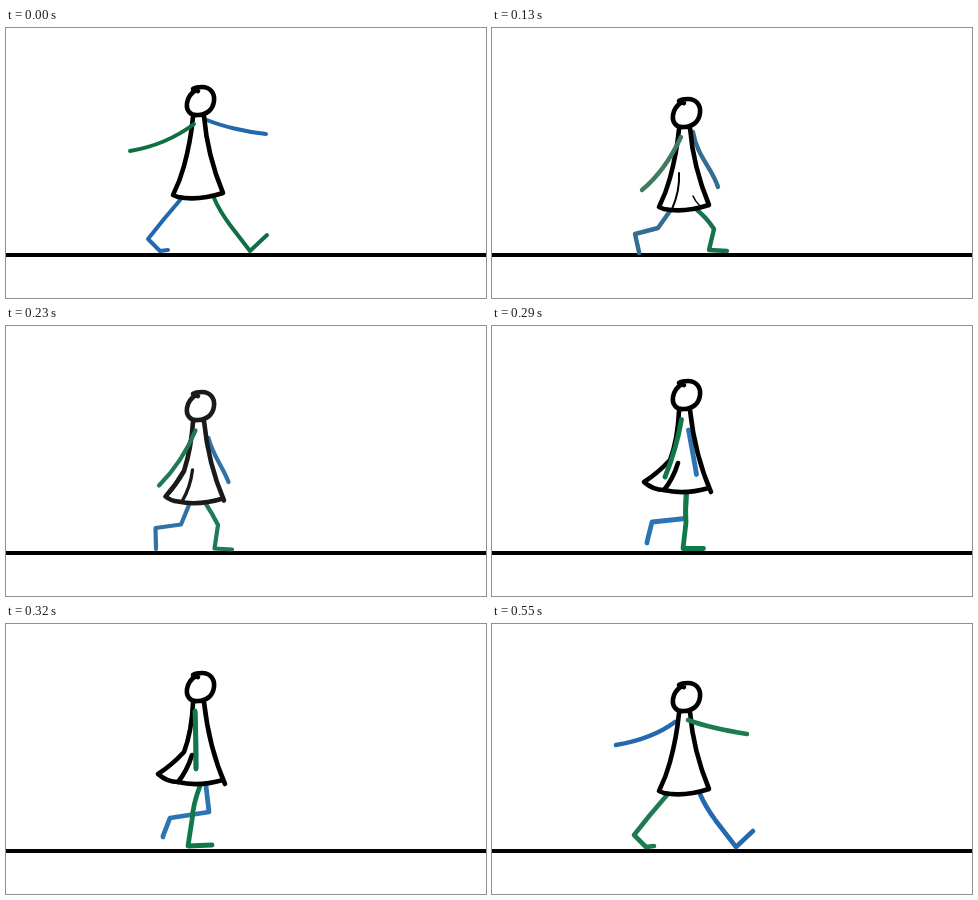
An HTML page for the animation above (650 ms loop, 480 by 270 pixels).

```html
<!DOCTYPE html>
<html lang="en">
<head>
<meta charset="utf-8">
<title>Walk cycle</title>
<style>
  html, body { margin: 0; width: 100%; height: 100%; overflow: hidden; background: #fff; }
  svg { display: block; width: 100%; height: 100%; }
  path { fill: none; stroke-linecap: round; stroke-linejoin: round; }
</style>
</head>
<body>
<svg viewBox="0 0 480 270">
  <rect y="225" width="480" height="4"/>
  <g id="walker"></g>
</svg>
<script>
const HEAD = 'M192 63 L187 61 Q190 59 196 59 C204 59 209 65 208 73 C207 82 200 87 192 87 C184 88 180 82 181 75 C182 69 185 65 190 62';

// Dress outlines and folds are drawn at rest height and moved by the bob.
const STRAIGHT = 'M187 89 C185 110 181 127 178 138 Q174 153 167 167 Q169 168 172 169 Q192 173 217 165 M198 88 C200 112 207 141 217 165';
const FLARED = 'M187 89 C186 112 181 130 178 138 Q166 151 152 160 Q161 168 172 168 Q192 173 217 166 M198 88 C201 115 208 145 219 170';
const TRAILING = 'M186 88 C184 116 176 140 152 166 Q160 170 170 169 Q188 168 206 171 C204 150 202 116 198 88';
const FLARED_FOLD = 'M186 141 Q181 157 172 168';

const contact = {
  bob: 0, dress: STRAIGHT, green: '#0f6f43', blue: '#2268ad', limbWidth: 4,
  greenArm: 'M188 96 Q160 117 124 123',
  blueArm: 'M201 92 C215 98 240 104 260 106',
  greenLeg: 'M208 170 Q213 182 224 197 L244 223 L261 207',
  blueLeg: 'M175 171 L158 191 L142 211 L154 223 L162 222'
};
const down = {
  bob: 12, dress: STRAIGHT, green: '#16724a', blue: '#336d92', armGreen: '#427a61', limbWidth: 4.4,
  fold: 'M187 133 Q188 151 180 169', foldWidth: 2, crease: 'M201 156 Q203 161 208 166',
  greenArm: 'M189 109 Q173 143 150 162',
  blueArm: 'M201 104 C205 128 220 140 226 159',
  greenLeg: 'M205 182 Q214 189 222 201 L217 222 L235 223',
  blueLeg: 'M178 183 L166 200 L143 206 L147 224 L147 225'
};
const passing = {
  bob: 2, dress: FLARED, ink: '#1a1a1a', green: '#217a55', blue: '#2f72a8', limbWidth: 4.2,
  fold: FLARED_FOLD, foldWidth: 4.6,
  greenArm: 'M190 100 Q179 130 156 157',
  blueArm: 'M204 120 C208 130 214 142 219 153',
  greenLeg: 'M195 174 Q199 187 202 197 L200 223 L217 224',
  blueLeg: 'M188 175 L184 197 L156 198 L153 220 L153 221'
};
const up = {
  bob: -10, dress: FLARED, green: '#107849', blue: '#2d74b5', limbWidth: 4.8,
  fold: FLARED_FOLD, foldWidth: 4.6,
  greenArm: 'M189 87 Q190 115 190 145',
  blueArm: 'M189 88 C190 105 190 125 190 144',
  greenLeg: 'M194 162 Q187 180 186 196 L182 222 L206 221',
  blueLeg: 'M200 162 L203 188 L164 194 L157 212 L157 213'
};
const reach = {
  bob: -10, dress: TRAILING, green: '#11734a', blue: '#3a736b', limbWidth: 4.2,
  fold: 'M183 143 Q181 160 168 168', foldWidth: 4,
  greenArm: 'M193 87 C199 106 215 118 227 139',
  blueArm: 'M184 92 Q169 118 138 130',
  greenLeg: 'M188 162 Q174 187 152 215 Q153 223 168 223',
  blueLeg: 'M201 163 L216 189 L196 204 L207 217'
};
// The opposite step: the same stance with the limb colours exchanged.
const opposite = {
  ...contact, green: '#1d7a51', blue: '#2468b0', limbWidth: 4.6,
  greenArm: 'M196 96 C212 102 236 107 255 110',
  blueArm: 'M183 98 Q160 115 124 121',
  greenLeg: contact.blueLeg,
  blueLeg: contact.greenLeg
};

function mixPath(a, b) {
  const numbers = b.match(/-?[\d.]+/g);
  let i = 0;
  return a.replace(/-?[\d.]+/g, n => (+n + +numbers[i++]) / 2);
}

function between(a, b) {
  const pose = { ...b, bob: (a.bob + b.bob) / 2, crease: '', fold: '' };
  for (const part of ['dress', 'greenArm', 'blueArm', 'greenLeg', 'blueLeg'])
    pose[part] = mixPath(a[part], b[part]);
  if (a.fold) {
    pose.fold = mixPath(a.fold, b.fold);
    pose.foldWidth = (a.foldWidth + b.foldWidth) / 2;
  }
  return pose;
}

const stroke = (d, color, width) =>
  d ? `<path d="${d}" stroke="${color}" stroke-width="${width}"/>` : '';

function draw(pose) {
  const { ink = '#000', limbWidth, armGreen = pose.green } = pose;
  return stroke(pose.blueArm, pose.blue, limbWidth) +
    stroke(pose.blueLeg, pose.blue, limbWidth) +
    stroke(pose.greenLeg, pose.green, limbWidth) +
    `<g transform="translate(0 ${pose.bob})">` +
    stroke(pose.dress, ink, 4.6) +
    stroke(pose.fold, ink, pose.foldWidth) +
    stroke(pose.crease, ink, 1.5) +
    stroke(HEAD, ink, 4.6) + '</g>' +
    stroke(pose.greenArm, armGreen, limbWidth);
}

const LOOP = 650;
const steps = [
  [0, contact], [100, between(contact, down)], [130, down],
  [230, between(down, passing)], [260, passing], [290, between(passing, up)],
  [320, up], [450, reach], [550, opposite]
].map(([start, pose]) => ({ start, markup: draw(pose) }));

const walker = document.getElementById('walker');
const origin = performance.now();
let shown;

function tick() {
  const time = (performance.now() - origin) % LOOP;
  const step = steps.findLast(s => s.start <= time);
  if (step !== shown) {
    walker.innerHTML = step.markup;
    shown = step;
  }
  requestAnimationFrame(tick);
}
tick();
</script>
</body>
</html>
```
